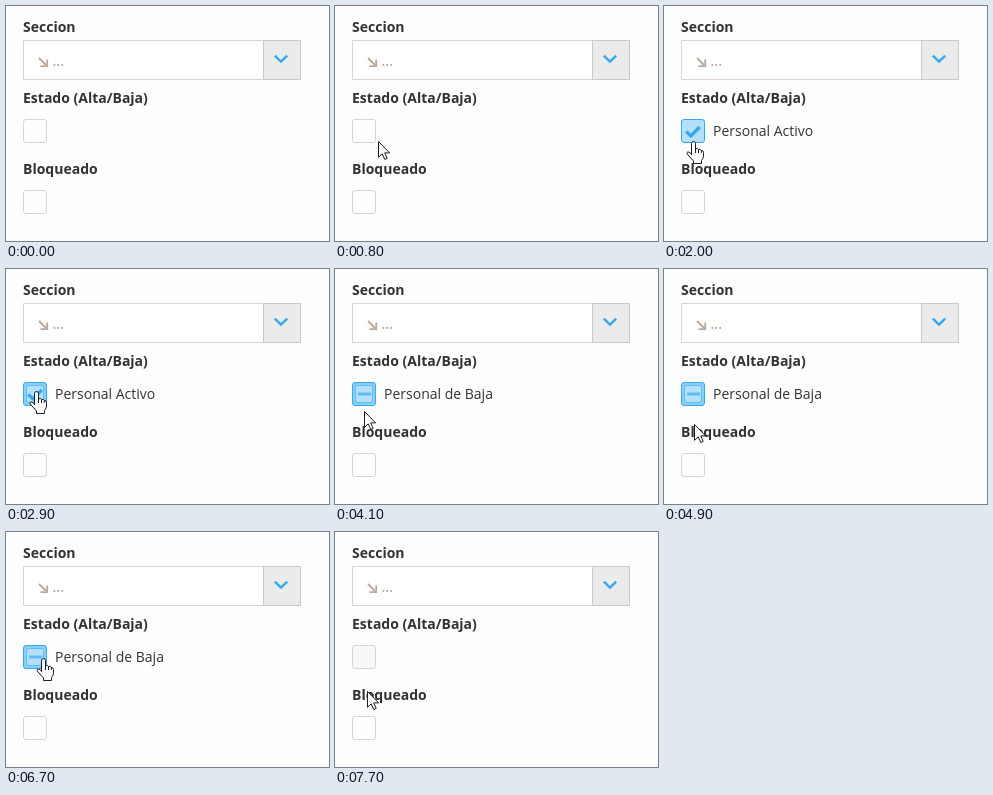
Animation of 323x235 px, one loop 8 s. Source, as an HTML page with a canvas:

```html
<!DOCTYPE html>
<html lang="es">
<head>
<meta charset="utf-8">
<title>Formulario</title>
<style>
html, body { margin: 0; width: 100%; height: 100%; overflow: hidden; background: #fefefe; }
canvas { display: block; }
</style>
</head>
<body>
<canvas id="stage" width="323" height="235"></canvas>
<script>
const ctx = document.getElementById('stage').getContext('2d');
const LOOP = 8000;
const STEP = 100;
const SHOW = 100, CHECK = 1100, FOCUS = 2900, MINUS = 3600, FADE = 6900, CLEAR = 7100;

const BLUE = '#36a9ee';
const SOFT_BLUE = '#62bcf4';
const PALE = '#b4e0fc';
const RING = '#8acefa';
const TAN = '#b9a79b';
const BORDER = '#d5d5d5';

const ARROW = new Path2D('M.5 .5V16.3L4.2 12.8L6.8 18.5L9.2 17.4L6.7 11.9H11.6Z');
const HAND = new Path2D('M5.5 14V2.5Q5.5 .5 7.5 .5T9.5 2.5V8Q11.6 6.6 12.5 8.5Q14.7 7.6 15.3 9.5Q17.5 9.2 17.5 11.5V15Q17.5 17 15.5 19.5V22.5H7.5V20L3 15Q.4 12.5 1 11.5Q2.2 10 5.5 13Z');
const KNUCKLES = new Path2D('M9.5 8V12M12.5 8.5V12M15.3 9.5V12');

const STATUS = { x: 17, y: 113 };
const BLOCKED = { x: 17, y: 184 };
const SIZE = 24;

const entry = { x: 298, y: 97 };
const moves = [
  { from: 300, to: 700, x: 43, y: 135 },
  { from: 800, to: 1200, x: 36, y: 119 },
  { from: 1700, to: 2000, x: 29, y: 135 },
  { from: 2000, to: 2200, x: 28, y: 143 },
  { from: 2500, to: 2900, x: 30, y: 122 },
  { from: 3700, to: 4100, x: 29, y: 142 },
  { from: 4600, to: 5000, x: 30, y: 155 },
  { from: 5800, to: 5900, x: 34, y: 181 },
  { from: 5900, to: 6000, x: 38, y: 195 },
  { from: 6000, to: 6200, x: 36, y: 165 },
  { from: 6400, to: 6700, x: 37, y: 126 },
  { from: 7200, to: 7700, x: 32, y: 159 }
];

const smooth = u => u * u * (3 - 2 * u);
const easeOut = u => 1 - (1 - u) ** 4;

function pointerAt(t) {
  let { x, y } = entry;
  for (const move of moves) {
    if (t < move.from) break;
    const u = Math.min(1, (t - move.from) / (move.to - move.from));
    x += (move.x - x) * smooth(u);
    y += (move.y - y) * easeOut(u);
  }
  return { x: Math.round(x), y: Math.round(y) };
}

function inside(p, box) {
  return p.x >= box.x && p.x < box.x + SIZE && p.y >= box.y && p.y < box.y + SIZE;
}

function rect(x, y, w, h, r, fill, stroke) {
  ctx.beginPath();
  ctx.roundRect(x + .5, y + .5, w - 1, h - 1, r);
  ctx.fillStyle = fill;
  ctx.fill();
  ctx.strokeStyle = stroke;
  ctx.lineWidth = 1;
  ctx.stroke();
}

function checkbox({ x, y }, fill, stroke) {
  rect(x, y, SIZE, SIZE, 2.5, fill, stroke);
}

function line(points, color, width) {
  ctx.beginPath();
  points.forEach(([x, y]) => ctx.lineTo(x, y));
  ctx.strokeStyle = color;
  ctx.lineWidth = width;
  ctx.stroke();
}

function text(str, x, y, weight = 400, color = '#333') {
  ctx.font = `${weight} 14px "Open Sans", sans-serif`;
  ctx.fillStyle = color;
  ctx.fillText(str, x, y);
}

function drawSelect() {
  rect(17, 34, 278, 40, 0, '#fff', BORDER);
  rect(257, 34, 38, 40, 0, '#ebebeb', '#c9c9c9');
  line([[268.8, 49.6], [275, 55.6], [281.2, 49.6]], BLUE, 2.5);
  line([[33, 52], [40, 59]], TAN, 1.8);
  line([[41.2, 53.5], [41.2, 60.2], [34.5, 60.2]], TAN, 1.8);
  text('...', 46.5, 60, 600, TAN);
}

function drawStatus(t) {
  const checked = t >= CHECK && t < CLEAR - STEP;
  if (!checked) {
    checkbox(STATUS, t < CHECK ? '#fefefe' : '#f8f8f8', BORDER);
  } else if (t < FOCUS) {
    checkbox(STATUS, PALE, BLUE);
  } else {
    checkbox(STATUS, RING, BLUE);
    rect(20, 116, 18, 18, 1.5, PALE, SOFT_BLUE);
  }

  if (checked && t < MINUS) {
    line([[22.3, 125.4], [26.8, 129.9], [35.7, 121]], BLUE, 3.4);
  } else if (checked) {
    line([[23, 125], [36, 125]], SOFT_BLUE, 3);
  }

  if (t >= CHECK && t < CLEAR) {
    ctx.globalAlpha = Math.min(1, (CLEAR - t) / (CLEAR - FADE + STEP));
    text(t < MINUS ? 'Personal Activo' : 'Personal de Baja', 49, 130);
    ctx.globalAlpha = 1;
  }
}

function drawPointer(t) {
  if (t < SHOW) return;
  const tip = pointerAt(t);
  const hand = inside(tip, STATUS) || inside(tip, BLOCKED);
  const shape = hand ? HAND : ARROW;
  ctx.save();
  ctx.translate(tip.x - (hand ? 7 : 0), tip.y);
  ctx.fillStyle = '#fff';
  ctx.strokeStyle = '#1c1c1c';
  ctx.lineWidth = 1;
  ctx.fill(shape);
  ctx.stroke(shape);
  if (hand) ctx.stroke(KNUCKLES);
  ctx.restore();
}

function draw(t) {
  ctx.fillStyle = '#fefefe';
  ctx.fillRect(0, 0, 323, 235);
  text('Seccion', 17, 26, 700);
  text('Estado (Alta/Baja)', 17, 97, 700);
  text('Bloqueado', 17, 168, 700);
  drawSelect();
  drawStatus(t);
  checkbox(BLOCKED, '#fefefe', BORDER);
  drawPointer(t);
}

const start = performance.now();
function tick() {
  const t = (performance.now() - start) % LOOP;
  draw(Math.floor(t / STEP) * STEP);
  requestAnimationFrame(tick);
}
tick();
</script>
</body>
</html>
```
